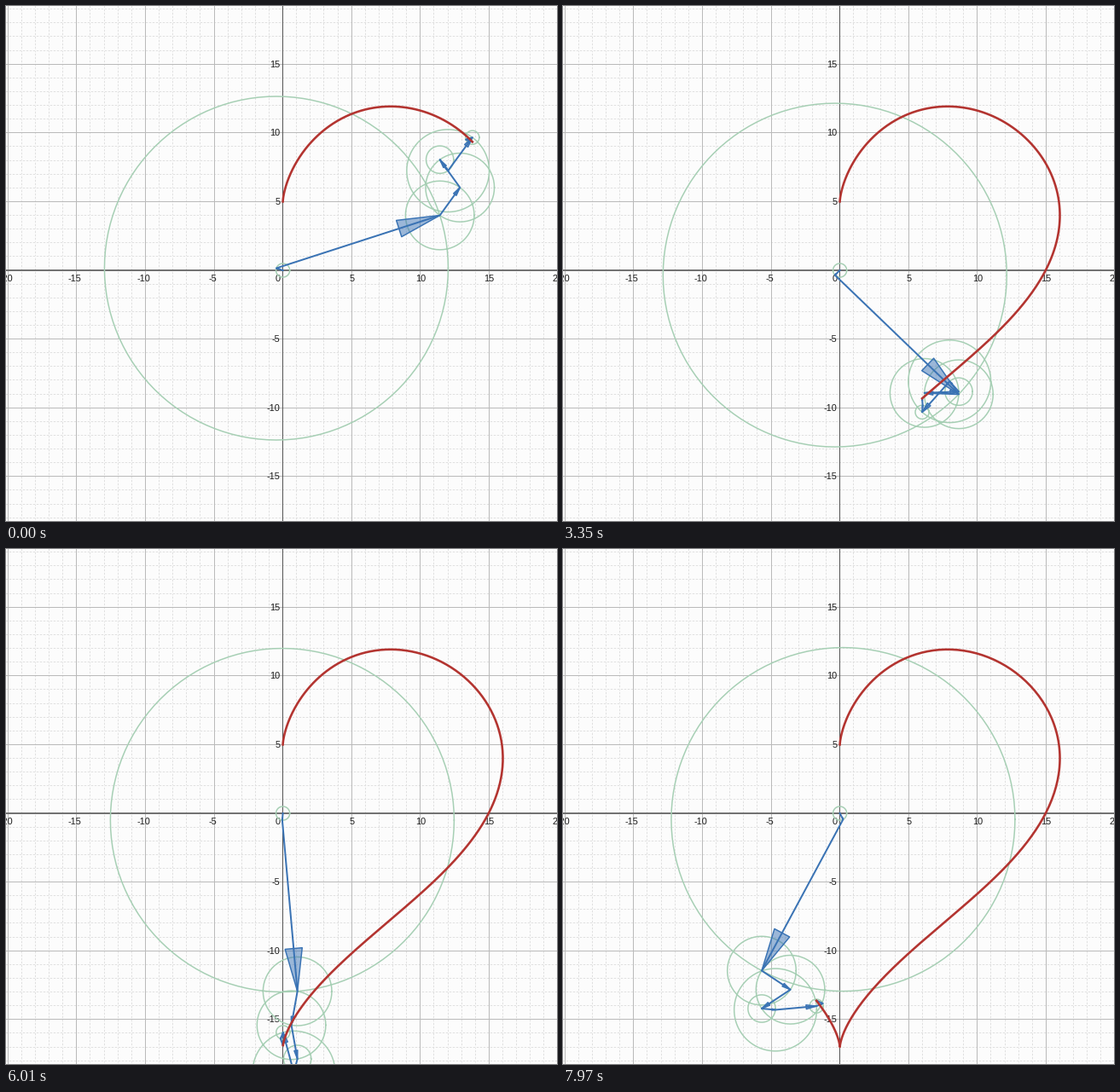
A matplotlib script that plays this animation: 646x604 px, repeating every 7990 ms.

```python
import numpy as np
import matplotlib.pyplot as plt
from matplotlib.animation import FuncAnimation
from matplotlib.collections import PolyCollection

W, H, DPI = 646, 604, 64
PX = 72 / DPI                      # points per pixel
X0, Y0, UNIT = 324.6, 310.0, 16.12
LOOP, STEP = 7990, 17

BLUE, GREEN, RED = "#3a73b4", "#a6cfb4", "#b33430"
PAPER, GAP, DASH, MAJOR, AXIS = 252, 246, 224, 186, 84

# Heart curve as rotating vectors: (frequency, amplitude along i)
TERMS = [(1, .5), (-1, 12.5), (2, -2.5), (-2, -2.5),
         (3, 1), (-3, -3), (4, -.5), (-4, -.5)]
FREQ = np.array([f for f, _ in TERMS])
AMP = np.array([a for _, a in TERMS])

# Angle reached after a number of drawing ticks
TICKS = np.array([0, 21, 47, 72, 116, 143, 171]) / 171
ANGLES = [1.258, 1.617, 2.005, 2.338, 2.885, 3.241, 3.635]
ANGLE_FIT = np.polyfit(TICKS, ANGLES, 5)


def angle(ms):
    """Ticks come in threes, held for 20, 20 and 100 ms."""
    group, rest = divmod(ms + 10 if ms >= 20 else 0, 140)
    tick = 3 * group + min(rest // 20, 2)
    return np.polyval(ANGLE_FIT, tick / 171)


def to_px(z):
    return X0 + UNIT * np.real(z), Y0 - UNIT * np.imag(z)


def vectors(t):
    return 1j * AMP * np.exp(1j * FREQ * t)


def heart(t):
    x = 16 * np.sin(t) ** 3
    y = 13 * np.cos(t) - 5 * np.cos(2 * t) - 2 * np.cos(3 * t) - np.cos(4 * t)
    return x + 1j * y


def grid_image():
    img = np.full((H, W, 3), PAPER, np.uint8)
    cols = {k: int(X0 + UNIT * k) for k in range(-20, 20)}
    rows = {k: int(Y0 - UNIT * k) for k in range(-18, 20)}
    dash_y = np.arange(H) % 4 < 2
    dash_x = np.arange(W) % 4 < 2
    for x in cols.values():
        img[:, x] = GAP
        img[dash_y, x] = DASH
    for y in rows.values():
        img[y, :] = GAP
        img[y, dash_x] = DASH
    for k in range(-15, 16, 5):
        img[rows[k], :] = MAJOR
    for k in range(-20, 20, 5):
        img[:, cols[k]] = MAJOR
    img[rows[0] - 1:rows[0] + 1, :] = AXIS + 30
    img[:, cols[0]] = AXIS
    return img


fig = plt.figure(figsize=(W / DPI, H / DPI), dpi=DPI)
fig.figimage(grid_image(), origin="upper", zorder=-1)
ax = fig.add_axes([0, 0, 1, 1])
ax.set_xlim(0, W)
ax.set_ylim(H, 0)
ax.axis("off")


def label(x, y, text, ha):
    ax.text(x, y, text, ha=ha, va="center_baseline", color="#1c1c1c",
            family="Liberation Sans", size=11 * PX, zorder=1)


for n in range(-20, 21, 5):
    if n:
        label(X0 + UNIT * n - (2 if n < 0 else 0), 318.8, str(n), "center")
        if abs(n) < 20:
            label(321.5, Y0 - UNIT * n - .5, str(n), "right")
label(321.5, 318.8, "0", "right")

rings, = ax.plot([], [], color=GREEN, lw=1.5 * PX, zorder=2)
chain, = ax.plot([], [], color=BLUE, lw=2 * PX, zorder=3)
heads = PolyCollection([], facecolors=(.23, .45, .71, .5), edgecolors=BLUE,
                       linewidths=1.5 * PX, zorder=4)
ax.add_collection(heads)
trail, = ax.plot([], [], color=RED, lw=2.6 * PX, zorder=5)

UNIT_RING = np.append(np.exp(1j * np.linspace(0, 2 * np.pi, 121)), np.nan)


def draw(i):
    t = angle((i + 1) * STEP - 1)
    vec = vectors(t)
    joints = np.append(0, np.cumsum(vec))
    chain.set_data(*to_px(joints))

    # The last vector carries no ring
    circles = joints[:-2, None] + np.abs(AMP)[:-1, None] * UNIT_RING
    rings.set_data(*to_px(circles.ravel()))

    tips = joints[1:]
    tri = np.stack([tips, tips - (.25 + .05j) * vec, tips - (.25 - .05j) * vec], 1)
    heads.set_verts(np.stack(to_px(tri), -1))

    trail.set_data(*to_px(heart(np.linspace(0, t, 300))))
    return rings, chain, heads, trail


anim = FuncAnimation(fig, draw, frames=LOOP // STEP, interval=STEP,
                     repeat=True, repeat_delay=0)
plt.show()
```
